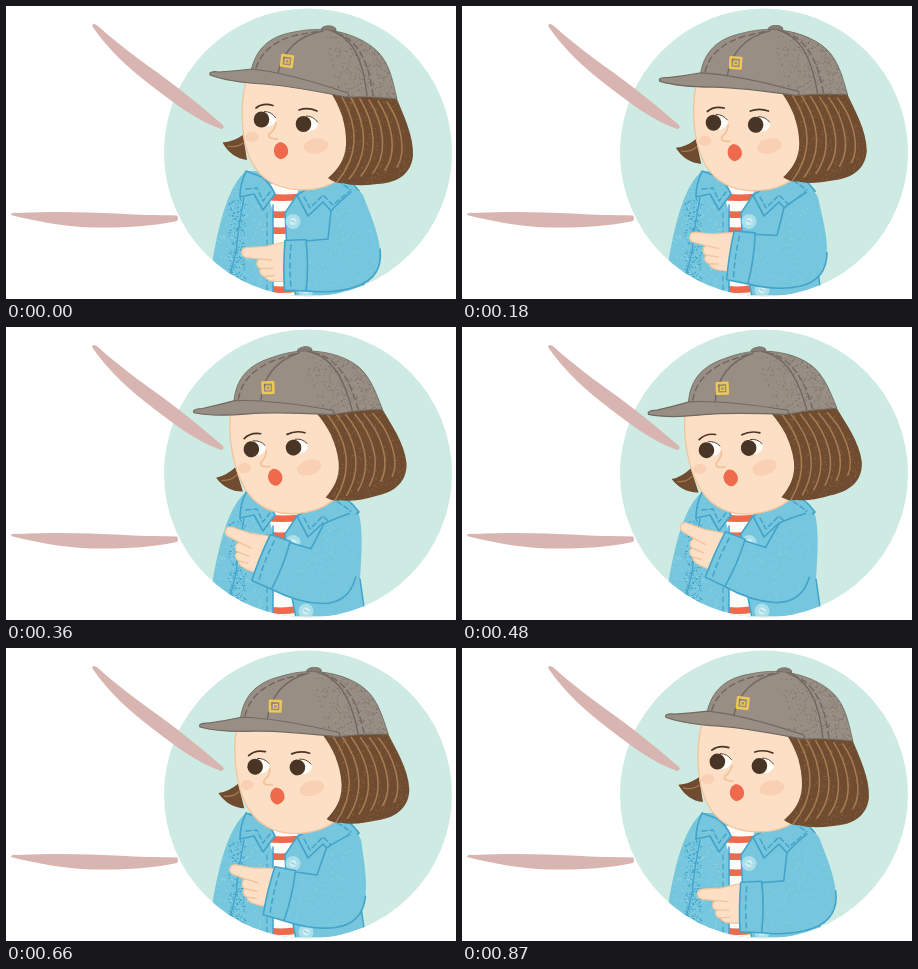
An HTML page with a canvas for the animation above (900 ms loop, 450x293 px).

```html
<!DOCTYPE html>
<html lang="en">
<head>
<meta charset="utf-8">
<title>Pointing girl</title>
<style>
  html, body { margin: 0; width: 100%; height: 100%; overflow: hidden; background: #fff; }
  canvas { display: block; width: 450px; height: 293px; }
</style>
</head>
<body>
<canvas id="stage" width="450" height="293"></canvas>
<script>
const ctx = document.getElementById('stage').getContext('2d');
const LOOP = 900, STEP = 30;
const HEAD = { x: 310, y: 187, turn: -9.3 };
const ARM = { x: 343, y: 182, turn: 23.6 };
const C = {
  mint: '#cdeae3', rose: '#d8b5b0', skin: '#fcdfc5', skinLine: '#f3c49b', blush: '#f9d0b4',
  denim: '#76c7de', denimDark: '#43a3ca', denimLight: '#a9dfea', cap: '#988e84', seam: '#706963',
  hair: '#6f4b2f', strand: '#a87c53', red: '#ef6a4c', gold: '#efc755', dark: '#493525'
};

const disc = new Path2D();
disc.arc(302, 146.5, 144, 0, Math.PI * 2);

const shape = {
  upperStroke: new Path2D('M86 20Q87 16 92 20C117 43 146 62 172 82Q194 99 217 119Q219 122 215 123C190 114 168 97 147 81C124 63 103 45 86 20Z'),
  lowerStroke: new Path2D('M5 209Q5 206 12 207C50 205 80 206 110 207.5C135 209 150 209 171 209.5Q173 212 171 215C142 221 115 222 86 221.5C58 220.5 28 215 5 209Z'),
  jacket: new Path2D('M240 165C223 179 213 215 206 258L212 292H360L354 252C356 222 357 199 352 184Q346 173 322 166Z'),
  shirt: new Path2D('M258 178H294L291 189L279 207L281 245L290 293H267V205Z'),
  leftCollar: new Path2D('M240 165Q234 178 234 191L248 188L257 204L269 188Q264 177 256 171Z'),
  rightCollar: new Path2D('M325 163Q342 170 353 185L326 206L317 196L302 210L291 189Q306 181 325 163Z'),
  arm: new Path2D('M345 184Q331 198 325 205L322 233L299 235L300 285Q330 288 352 280C370 273 376 259 374 243C372 225 363 205 357 189Q351 181 345 184Z'),
  cuff: new Path2D('M279 234.5L300 233.5Q303 260 300 285L278.5 284Q277 260 279 234.5Z'),
  hand: new Path2D('M281 236C272 237 266 239 259 240.5L241 241.5C234 242 234 250 240 251.5L253 253C249 257 251 262 255 262.5C252 266 255 270 259 270.5C260 275 266 276.5 281 275Z'),
  face: new Path2D('M240 76C235 94 235 119 239 137C243 156 252 170 268 178C288 187 313 185 327 177Q343 168 345 130L330 84Z'),
  tuft: new Path2D('M216.5 136.5Q227 136 237 129L241 154Q225 152 216.5 136.5Z'),
  hair: new Path2D('M325 87C333 99 341 118 340 139C339 155 331 164 322 172Q328 177 336 177Q350 181 371 178C393 177 405 167 407 150C408 129 397 109 389 88Z'),
  crown: new Path2D('M245 65C250 42 264 30 288 26C303 23 312 23 322 24C340 26 361 34 373 47C384 59 387 76 391 93Q366 90 341 91L290 80Z'),
  brim: new Path2D('M204 67Q206 65 213 66Q230 65 246 63C275 66 315 78 342 87Q344 90 340 91C310 85 285 80 258 78C239 77 220 75 204 69Z')
};

function seeded(seed) {
  return () => (seed = (seed * 16807) % 2147483647) / 2147483647;
}

// Scatter of grain inside a box, denser towards its right side when lean < 1.
function grain(seed, count, x, y, w, h, lean = 1) {
  const rnd = seeded(seed), path = new Path2D();
  for (let i = 0; i < count; i++) {
    path.rect(x + w * rnd() ** lean, y + h * rnd(), 0.6 + rnd() * 0.7, 0.6 + rnd() * 0.7);
  }
  return path;
}

const grains = {
  cap: grain(31, 480, 320, 25, 68, 68, 0.65),
  hair: grain(57, 420, 324, 90, 82, 92),
  sleeve: grain(73, 260, 222, 192, 17, 97, 0.8),
  jacket: grain(19, 260, 208, 175, 60, 115),
  arm: grain(91, 170, 303, 200, 70, 80)
};

function fill(path, color) {
  ctx.fillStyle = color;
  ctx.fill(path);
}

function line(path, color, width = 1.5, dash = []) {
  ctx.strokeStyle = color;
  ctx.lineWidth = width;
  ctx.setLineDash(dash);
  ctx.stroke(typeof path === 'string' ? new Path2D(path) : path);
  ctx.setLineDash([]);
}

function oval(x, y, rx, ry, color, tilt = 0) {
  const path = new Path2D();
  path.ellipse(x, y, rx, ry, tilt, 0, Math.PI * 2);
  fill(path, color);
}

function within(path, draw) {
  ctx.save();
  ctx.clip(path);
  draw();
  ctx.restore();
}

function turned(joint, amount, draw) {
  ctx.save();
  ctx.translate(joint.x, joint.y);
  ctx.rotate(joint.turn * amount * Math.PI / 180);
  ctx.translate(-joint.x, -joint.y);
  draw();
  ctx.restore();
}

function button(x, y) {
  oval(x, y, 7.5, 7.5, C.denimLight);
  oval(x, y, 3.5, 3.5, '#d1eff3');
  line(`M${x - 2} ${y - 1}l4 2`, '#78c2d7', 1);
}

function drawBody() {
  fill(shape.jacket, C.denim);
  within(shape.jacket, () => {
    fill(grains.jacket, '#9bd8e6');
    fill(grains.sleeve, '#2d97c4');
  });
  line('M238 192Q232 222 230 246L222 277', C.denimDark, 1.3);

  fill(shape.shirt, '#fffdfa');
  within(shape.shirt, () => {
    line('M259 190Q276 194 306 189M264 208Q276 210 291 207M264 224Q276 226 292 223' +
      'M264 241Q276 243 292 240M264 283Q278 285 292 282', C.red, 6.5);
  });
  line('M267 199V290M291 189L279 207L281 245L290 291M354 252L358 280', C.denimDark, 1.5);
  line('M261 207V284', C.denimDark, 1.2, [5, 4]);

  for (const collar of [shape.leftCollar, shape.rightCollar]) {
    fill(collar, C.denim);
    line(collar, C.denimDark, 1.7);
  }
  line('M240 183L251 182L257 195L264 186M298 191L304 202L317 189L327 199L345 184L326 171', C.denimDark, 1.5, [5, 3]);
  button(287, 215.5);
  button(300, 284);
}

function drawArm() {
  fill(shape.arm, C.denim);
  within(shape.arm, () => fill(grains.arm, '#8fd2e3'));
  line('M345 186Q331 198 325 205L322 233L299 235M300 285Q330 288 352 280C370 273 376 259 374 243', C.denimDark, 1.6);
  fill(shape.hand, C.skin);
  line(shape.hand, C.skinLine, 1.2);
  line('M252 253L266 254M255 262.5L267 262.5M259 270.5L268 269.5', C.skinLine, 1.4);
  fill(shape.cuff, C.denim);
  line(shape.cuff, C.denimDark, 1.6);
  line('M285 239Q283 260 285 281', C.denimDark, 1.5, [5, 4]);
}

function eye(x, y) {
  oval(x + 4, y - 0.5, 10.5, 7.8, '#fffdf8', 0.1);
  oval(x, y, 7.8, 8, C.dark);
  line(`M${x + 3} ${y - 8}Q${x + 10} ${y - 8} ${x + 14} ${y - 2}`, C.dark, 0.9);
}

function drawFace() {
  fill(shape.tuft, C.hair);
  line('M222 140Q231 142 237 137', C.strand, 1.2);
  fill(shape.face, C.skin);
  line(shape.face, C.skinLine, 1.3);
  oval(246, 131, 6.5, 5, C.blush);
  oval(310, 140, 12.5, 7.5, C.blush, -0.15);
  eye(255.5, 113.5);
  eye(297.5, 118);
  line('M250 102Q257 96.5 267 99.5M293 104Q302 101 311 105', C.dark, 1.7);
  line('M270 117Q269 124 263 128Q261 133 271 133', C.skinLine, 1.8);
  fill(new Path2D('M274 136C282 137 284 146 280.5 150Q275 156 270 150.5C266 145 268 138 274 136Z'), C.red);
}

function drawHair() {
  fill(shape.hair, C.hair);
  within(shape.hair, () => {
    fill(grains.hair, '#8b6443');
    for (let i = 0; i < 6; i++) {
      const x = 336 + i * 9, end = 331 + i * 12;
      line(`M${x} ${91 + i}C${x + 14} 116 ${x + 20} 146 ${end} ${176 - i * 3}`, C.strand, 1.5);
    }
  });
  line('M326 92Q332 101 336 112', '#f8dfbd', 1.4);
}

function drawCap() {
  oval(322.5, 24, 8, 4.5, C.seam);
  oval(322.5, 23, 7, 3.5, '#857c74');
  fill(shape.crown, C.cap);
  within(shape.crown, () => fill(grains.cap, '#7a7169'));
  line(shape.crown, C.seam, 0.8);
  line('M272 67Q280 32 317 25M326 25C351 34 358 62 361 90', C.seam, 1.5);
  line('M250 62Q258 37 291 29L314 25', C.seam, 1.5, [6, 4]);
  line('M331 27C356 36 364 64 367 90', C.seam, 1.5, [6, 4]);
  fill(shape.brim, C.cap);
  line(shape.brim, C.seam, 1.2);
  ctx.save();
  ctx.translate(281, 55);
  ctx.rotate(0.12);
  line('M-5.3 -5.3H5.3V5.3H-5.3Z', C.gold, 2.5);
  line('M-1.8 -1.5H2V2H-1.8Z', C.gold, 1.3);
  ctx.restore();
}

function draw(time) {
  const now = Math.floor((time % LOOP) / STEP) * STEP;
  const sway = (1 - Math.cos(now / LOOP * Math.PI * 2)) / 2;
  ctx.fillStyle = '#fff';
  ctx.fillRect(0, 0, 450, 293);
  fill(disc, C.mint);
  fill(shape.upperStroke, C.rose);
  fill(shape.lowerStroke, C.rose);
  within(disc, () => {
    ctx.beginPath();
    ctx.rect(0, 0, 450, 289);
    ctx.clip();
    drawBody();
    turned(ARM, sway, drawArm);
    turned(HEAD, sway, () => {
      drawFace();
      drawHair();
      drawCap();
    });
  });
}

ctx.lineCap = ctx.lineJoin = 'round';
const start = performance.now();
function tick() {
  draw(performance.now() - start);
  requestAnimationFrame(tick);
}
tick();
</script>
</body>
</html>
```
